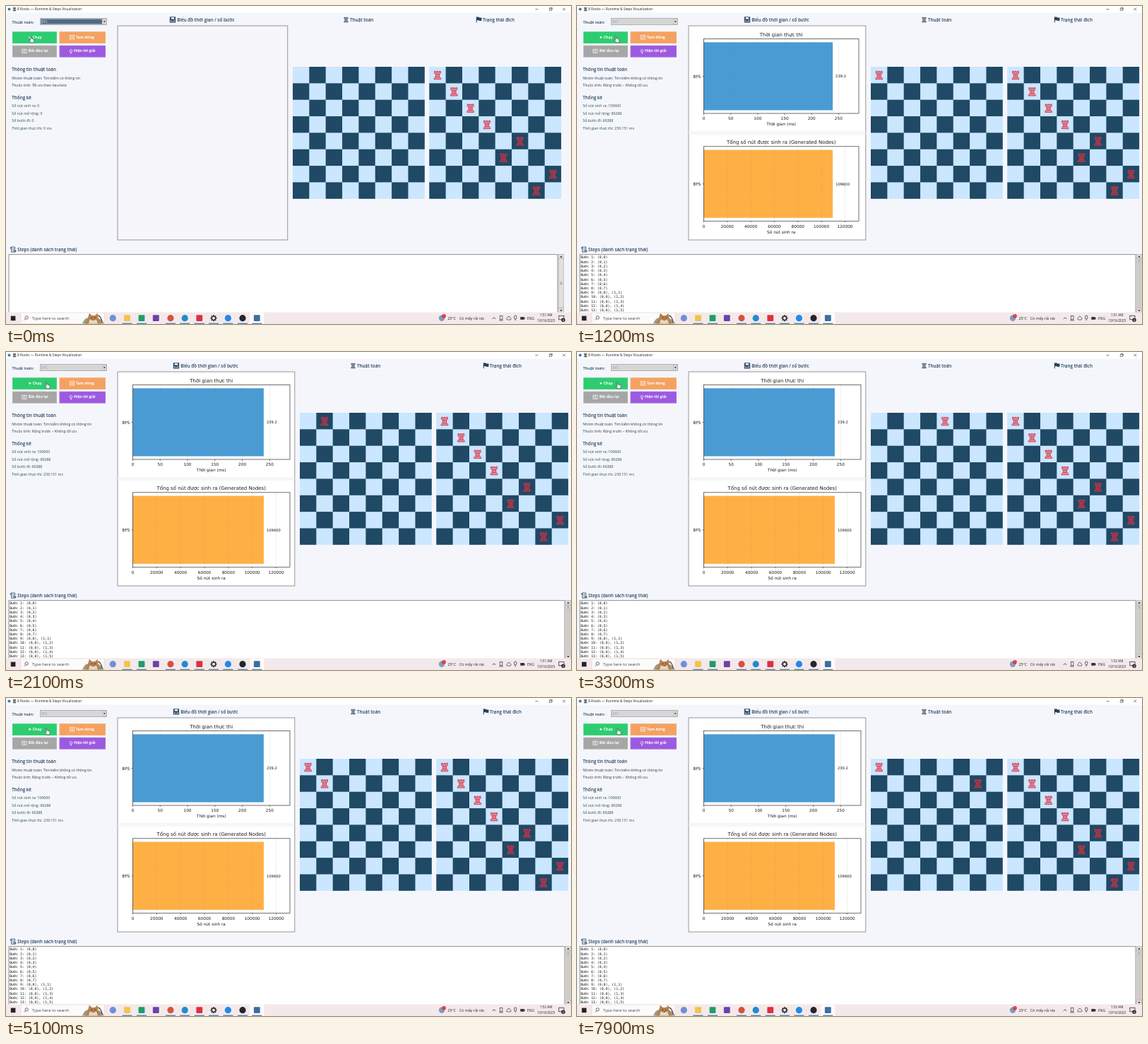
These frames come from a looping animation (800x450 px, 8000 ms). An HTML page:

```html
<!DOCTYPE html>
<html lang="vi">
<head>
<meta charset="utf-8">
<title>8 Rooks</title>
<style>
html, body { margin: 0; width: 100%; height: 100%; overflow: hidden; background: #f5f6fb; }
svg { display: block; width: 800px; height: 450px; }
text { font-family: "Open Sans", "Noto Sans", sans-serif; white-space: pre; }
.plot text { font-family: "DejaVu Sans", sans-serif; fill: #1c1c1c; }
.log text { font-family: "DejaVu Sans Mono", "Liberation Mono", monospace; fill: #151515; }
.idle, .busy, .normal, .pressed, .early, .late, .before, .after, #first, #second, #hand {
  animation: 8s step-end infinite; }
.idle { animation-name: idle; }
.busy { animation-name: busy; }
.normal { animation-name: normal; }
.pressed { animation-name: pressed; }
.early { animation-name: early; }
.late { animation-name: late; }
.before { animation-name: before; }
.after { animation-name: after; }
#first { animation-name: first; }
#second { animation-name: second; }
#hand { animation-name: hand; }
@keyframes idle { 0% { visibility: visible } 14.5%, 100% { visibility: hidden } }
@keyframes busy { 0% { visibility: hidden } 14.5%, 100% { visibility: visible } }
@keyframes normal { 0% { visibility: visible } 12% { visibility: hidden } 14.5%, 100% { visibility: visible } }
@keyframes pressed { 0% { visibility: hidden } 12% { visibility: visible } 14.5%, 100% { visibility: hidden } }
@keyframes early { 0% { visibility: hidden } 14.5% { visibility: visible } 20%, 100% { visibility: hidden } }
@keyframes late { 0% { visibility: hidden } 20%, 100% { visibility: visible } }
@keyframes before { 0% { visibility: visible } 37.5%, 100% { visibility: hidden } }
@keyframes after { 0% { visibility: hidden } 37.5%, 100% { visibility: visible } }
@keyframes first {
  0% { visibility: hidden; transform: translateX(0) }
  14.5% { visibility: visible; transform: translateX(0); animation-timing-function: steps(8) }
  63.49% { visibility: visible; transform: translateX(186.8px) }
  63.5%, 100% { visibility: visible; transform: translateX(0) }
}
@keyframes second {
  0% { visibility: hidden; transform: translateX(0) }
  63.5% { visibility: visible; transform: translateX(0); animation-timing-function: steps(6) }
  100% { visibility: visible; transform: translateX(140.1px) }
}
@keyframes hand {
  0%, 13% { transform: translateX(0); animation-timing-function: linear }
  15.5%, 17% { transform: translateX(25px); animation-timing-function: linear }
  19%, 100% { transform: translateX(22.5px) }
}
</style>
</head>
<body>
<svg id="stage" viewBox="0 0 800 450" xmlns="http://www.w3.org/2000/svg"></svg>
<script>
const NAVY = '#23405c', CELL = 23.35;
const rect = (x, y, w, h, fill, more = '') =>
  `<rect x="${x}" y="${y}" width="${w}" height="${h}" fill="${fill}" ${more}/>`;
const dot = (x, y, r, fill, more = '') => `<circle cx="${x}" cy="${y}" r="${r}" fill="${fill}" ${more}/>`;
const path = (d, stroke, width = 0.7, fill = 'none', more = '') =>
  `<path d="${d}" stroke="${stroke}" stroke-width="${width}" fill="${fill}" ${more}/>`;
const text = (x, y, str, size, fill = '#222', more = '') =>
  `<text x="${x}" y="${y}" font-size="${size}" fill="${fill}" ${more}>${str}</text>`;
const group = (cls, body, more = '') => `<g class="${cls}" ${more}>${body}</g>`;
const at = (x, y, body) => `<g transform="translate(${x} ${y})">${body}</g>`;
const range = n => [...Array(n).keys()];
const SEMI = 'font-weight="600"', BOLD = 'font-weight="700"', MID = 'text-anchor="middle"', END = 'text-anchor="end"';
const heading = (x, y, str) => text(x, y, str, 6.3, NAVY, SEMI);

// Rook centred on the origin
const rook = color =>
  path('M-4.4-5.4h1.8v1.5h1.7v-1.5h1.8v1.5h1.7v-1.5h1.8v3l-1.5 1.3h-5.8l-1.5-1.3z', color, 0.9, color, 'fill-opacity=".45"') +
  path('M-2.4-1.1L-2.8 2.9M2.4-1.1L2.8 2.9M-.9-.8V2.8M.9-.8V2.8', color, 1) +
  path('M-3.3 3h6.6l1.6 1.7v1.3h-9.8v-1.3z', color, 0.9, color, 'fill-opacity=".45"');
const RED = '#e12f40';
const inCell = (row, col, body) => at((col + 0.5) * CELL, (row + 0.5) * CELL, body);

function board(x, body) {
  const dark = range(64).filter(i => (i + (i >> 3)) % 2)
    .map(i => rect((i % 8) * CELL, (i >> 3) * CELL, CELL, CELL, '#1f4965')).join('');
  return at(x, 86, rect(0, 0, 8 * CELL, 8 * CELL, '#cbe6ff') + dark + body);
}
const goal = [0, 1, 2, 3, 5, 4, 7, 6].map((col, row) => inCell(row, col, rook(RED))).join('');

function headers(chartX, shift) {
  const disk = path('M0 0h7.6v7.6h-7.6z', NAVY, 0.6, NAVY) + rect(1.6, 0.5, 4.4, 2.4, '#f5f6fb') +
    path('M1.6 7v-2.4M3.7 7v-1.6M5.8 7v-3', '#f5f6fb', 1);
  const flag = path('M.5 0V8', NAVY, 1) + path('M.8.5h2.8l1 .9h2.8v4h-3.2l-.8-.8h-2.6z', NAVY, 0.4, NAVY);
  return at(chartX, 15.6, disk) + heading(chartX + 10, 21.8, 'Biểu đồ thời gian / số bước') +
    at(481.5 + shift, 19.3, `<g transform="scale(.6)">${rook(NAVY)}</g>`) +
    heading(487 + shift, 21.8, 'Thuật toán') +
    at(665.8 + shift, 15.3, flag) + heading(675 + shift, 21.8, 'Trạng thái đích');
}

function axes(top, right, unit, step, count, value, color, title, label, note) {
  const left = 179.5, bottom = top + 105.5, mid = (left + right) / 2;
  const end = left + value / step * unit;
  const ticks = range(count).map(i => {
    const x = left + i * unit;
    return path(`M${x} ${top}V${bottom}`, '#8f8f8f', 0.5, 'none', 'stroke-opacity=".45" stroke-dasharray="2 1"') +
      path(`M${x} ${bottom}v2`, '#222', 0.6) +
      text(x, bottom + 9.2, i * step, 5.8, '', MID);
  }).join('');
  return rect(left, top, right - left, 105.5, '#fff') +
    rect(left, top + 4.8, end - left, 96.2, color) + ticks +
    rect(left, top, right - left, 105.5, 'none', 'stroke="#333" stroke-width=".7"') +
    path(`M${left - 2} ${top + 53}h2`, '#222', 0.6) +
    text(175.3, top + 55.2, 'BFS', 5.8, '', END) +
    text(end + 4, top + 54.8, note, 5.2) +
    text(mid, top - 3.4, title, 6.95, '', MID) +
    text(mid, bottom + 17.3, label, 5.8, '', MID);
}

const charts = (cls, right, msUnit, nodeUnit) => group(cls + ' plot',
  axes(46.5, right, msUnit, 50, 6, 239.151, '#4a9bd4', 'Thời gian thực thi', 'Thời gian (ms)', '239.2') +
  axes(198.8, right, nodeUnit, 20000, 7, 109600, '#ffb045',
    'Tổng số nút được sinh ra (Generated Nodes)', 'Số nút sinh ra', '109600'));

const frame = (width, fill) => rect(158, 28, width, 303, fill, 'stroke="#8b8b8d" stroke-width=".9"');

function button(x, y, w, fill, icon, label, labelX) {
  return rect(x, y, w, 16.8, fill) +
    rect(x + 0.5, y + 0.5, w - 1, 15.8, 'none', 'stroke="#fff" stroke-opacity=".4" stroke-width=".5" stroke-dasharray="1.5 1.5"') +
    icon + text(labelX, y + 9.4, label, 5.2, '#fff', BOLD);
}
const boxIcon = (x, y, mark) => rect(x, y, 6.2, 5.4, 'none', 'stroke="#fff" stroke-width=".7"') +
  path(mark, '#fff', 0.8, 'none', `transform="translate(${x} ${y})"`);
const play = path('M32.6 42.4l3.4 1.9-3.4 1.9z', 'none', 0, '#fff');
const run = fill => button(9, 36.2, 63, fill, play, 'Chạy', 37.8);

function info(lines) {
  return lines.map((s, i) => text(8.3, [103.8, 114.2, 143.3, 153.8, 164.2, 174.7][i], s, 5.2, i < 2 ? '#263b45' : '#24503f')).join('');
}

function combo(fill, ink) {
  return rect(48.5, 17.6, 94, 8.8, '#dcdcdc', 'stroke="#9a9a9a" stroke-width=".7"') +
    rect(49.4, 18.5, 86.5, 7, fill) + text(50.3, 23.8, 'BFS', 4.8, ink) +
    rect(136.4, 18.2, 5.6, 7.6, '#dedbd6', 'stroke="#aaa" stroke-width=".4"') +
    path('M137.8 21.2h3l-1.5 2z', 'none', 0, '#222');
}

function logBox(width, thumbHeight) {
  const x = width + 5.2, grip = 357.5 + thumbHeight / 2;
  return rect(4, 351.7, width, 90, '#fff', 'stroke="#777" stroke-width=".8"') +
    rect(x, 351.4, 7.6, 84, '#cfcbc6') +
    rect(x, 351.4, 7.6, 6, '#e2dfdb', 'stroke="#aaa" stroke-width=".5"') +
    path(`M${x + 2.1} 355.8h3.4l-1.7-2.4z`, 'none', 0, '#222') +
    rect(x, 357.6, 7.6, thumbHeight, '#e2dfdb', 'stroke="#aaa" stroke-width=".5"') +
    path(`M${x + 2} ${grip - 1.2}h3.6m-3.6 1.3h3.6m-3.6 1.3h3.6`, '#777', 0.5) +
    rect(x, 427.8, 7.6, 6, '#e2dfdb', 'stroke="#aaa" stroke-width=".5"') +
    path(`M${x + 2.1} 430h3.4l-1.7 2.2z`, 'none', 0, '#222');
}
const log = group('log', range(13).map(i => {
  const spot = i < 8 ? `(0,${i})` : `(0,0), (1,${i - 7})`;
  return text(5.2, 357.4 + i * 6.22, `Bước ${i + 1}: ${spot}`, 4.9, '', 'font-weight="500"');
}).join(''));

function titleBar() {
  return rect(0, 0, 800, 9.4, '#fff') + dot(4.5, 4.5, 2, '#3d78b5') +
    at(12, 4.5, `<g transform="scale(.42)">${rook('#111')}</g>`) +
    text(16, 6.4, '8 Rooks — Runtime &amp; Steps Visualization', 4.8, '#222') +
    path('M749.5 4.5h4M769.3 3.3h3v3h-3zM770.3 3.3v-1h3v3h-1M788.3 2.6l3.8 3.8m0-3.8l-3.8 3.8', '#333', 0.6);
}

function lynx() {
  return path('M108 449.5q4-10 10-8l8-1q10 2 13 9z', 'none', 0, '#8fa08a') +
    path('M112 449.5l4-8 2-7 3.5 3.4h4.5l3.4-3.4 1 8 4 7z', 'none', 0, '#b5814f') +
    path('M118.5 443.5q5 2.5 9.5 0l2 6h-13z', 'none', 0, '#e8d7c0') +
    dot(121.3, 441.2, 0.7, '#30251c') + dot(126, 441.2, 0.7, '#30251c') +
    path('M122.5 443.8h2.4l-1.2 1.2z', 'none', 0, '#6b3f31') +
    path('M130 438q5 1 6 10', '#6f5134', 1.4);
}

function taskbar() {
  const square = (x, fill) => rect(x - 4.4, 437.3, 8.8, 8.8, fill, 'rx="1"');
  const round = (x, fill) => dot(x, 441.7, 4.6, fill);
  const clock = (cls, s) => group(cls, text(764.7, 439.4, s, 4.7, '#222', MID));
  const teeth = range(8).map(i => rect(-0.9, -4.5, 1.8, 2, '#333', `transform="rotate(${i * 45})"`)).join('');
  return rect(0, 433.4, 800, 16.6, '#f4e9ea') +
    rect(6.8, 438.6, 6.6, 6.6, '#222') +
    rect(21, 434, 118, 15.6, '#fdfafa', 'stroke="#ddd3d4" stroke-width=".5"') +
    dot(29.2, 440.9, 2.2, 'none', 'stroke="#333" stroke-width=".7"') + path('M27.6 442.6l-2 2.1', '#333') +
    text(37, 443.7, 'Type here to search', 5.75, '#444') + lynx() +
    rect(345.3, 433.8, 20, 16.2, '#fffafa') +
    round(151.3, '#6f8fd8') + square(171.5, '#f5c34a') + square(192, '#1f9d6b') + square(212.3, '#6a42a8') +
    round(233, '#dc4f3c') + round(253.2, '#2489cf') + square(273.8, '#e02f3f') +
    at(294, 441.7, teeth + dot(0, 0, 2.7, 'none', 'stroke="#333" stroke-width="1.5"')) +
    round(314.4, '#2588e8') + round(335, '#25252b') + square(355.3, '#3c6f9f') +
    [171.5, 192, 233, 253.2, 273.8, 294, 314.4, 335, 355.3].map(x => rect(x - 7, 448.7, 14, 1.3, '#4787bd')).join('') +
    dot(617, 441.7, 4.2, '#7e9dc0') + dot(620, 438.7, 2.8, '#d9303b') + text(620, 440.2, '1', 4, '#fff', MID) +
    text(625.4, 443.6, '25°C', 5.4, '#222') + text(641.7, 443.6, 'Có mấy rải rác', 5.4, '#222') +
    path('M688.8 442.9l2.2-2.2 2.2 2.2', '#222', 0.8) +
    rect(699.3, 438.3, 3.6, 5.5, 'none', 'stroke="#333" stroke-width=".7"') + path('M698.3 445h5.6', '#333') +
    path('M709.5 444h5q1.6-1.8-.6-3q-1-2.6-3.1-1.4q-1.2.8-1 1.8q-2.2.9-.3 2.6z', '#333') +
    rect(719.6, 438, 3.2, 5, 'none', 'rx="1.6" stroke="#333" stroke-width=".8"') + path('M721.2 443v2.2', '#333') +
    rect(728.3, 440, 5.5, 3.8, '#333') + rect(734, 441, 0.8, 1.8, '#333') +
    text(738, 443.5, 'ENG', 4.9, '#222') +
    clock('before', '1:51 AM') + clock('after', '1:52 AM') + text(764.7, 447.2, '10/16/2025', 4.7, '#222', MID) +
    rect(782.8, 438.3, 7.2, 5.5, 'none', 'stroke="#333" stroke-width=".8"') +
    dot(789, 444.2, 2.8, '#333') + text(789, 445.6, '4', 3.8, '#fff', MID);
}

const hand = path('M34 43.2q1.1-.7 1.5.6l.5 2.4q.9-.5 1.3.4q.9-.4 1.3.5q1-.2 1.1.8l.1 2-.8 2h-3.6l-2.6-3.3q.3-1.1 1.6-.2z',
  '#222', 0.6, '#fff');
const bulb = dot(92, 63.5, 1.8, 'none', 'stroke="#fff" stroke-width=".7"') + path('M91 66h2M91.2 67.1h1.6', '#fff');
const scroll = path('M7.6 341h5v7.2h-5zM7.6 341q-1.6.2-1.4 2h1.4M12.6 348.2q1.7-.1 1.5-1.8h-4.5', NAVY, 0.8) +
  path('M8.9 343.2h2.6m-2.6 1.7h2.6', NAVY, 0.6);

document.getElementById('stage').innerHTML =
  rect(0, 0, 800, 450, '#f5f6fb') + titleBar() +
  text(8.6, 24.5, 'Thuật toán:', 5.6, NAVY, SEMI) +
  group('normal', run('#2ecc71')) + group('pressed', run('#264653')) +
  button(75.5, 36.2, 65.5, '#f4a261', boxIcon(90.5, 41.6, 'M2.2 1.3v2.8M4 1.3v2.8'), 'Tạm dừng', 99) +
  button(9, 55.8, 63, '#a6a6a6', boxIcon(22.8, 61.2, 'M4.3 1.4q-2.8-.4-2.6 1.5q1.3 1.9 2.8.3'), 'Bắt đầu lại', 31.7) +
  button(75.5, 55.8, 65.5, '#9d5ae0', bulb, 'Hiện lời giải', 96) +
  heading(8.3, 92, 'Thông tin thuật toán') + heading(8.3, 131.6, 'Thống kê') +
  scroll + heading(16, 347, 'Steps (danh sách trạng thái)') +
  group('idle',
    combo('#4d6b85', '#dbe4ec') + headers(232.2, 0) + frame(240.8, '#f6f6fb') +
    info(['Nhóm thuật toán: Tìm kiếm có thông tin', 'Thuộc tính: Tối ưu theo heuristic',
      'Số nút sinh ra: 0', 'Số nút mở rộng: 0', 'Số bước đi: 0', 'Thời gian thực thi: 0 ms']) +
    board(406, '') + board(599.3, goal) + logBox(777, 69.5)) +
  group('busy',
    combo('#d6d6d6', '#a2a2a2') + headers(237.2, 10) + frame(250.8, '#fff') + rect(158.5, 176.8, 249.8, 5, '#f5f6fb') +
    info(['Nhóm thuật toán: Tìm kiếm không có thông tin', 'Thuộc tính: Rộng trước – Không tối ưu',
      'Số nút sinh ra: 109600', 'Số nút mở rộng: 69288', 'Số bước đi: 69288', 'Thời gian thực thi: 239.151 ms']) +
    board(416, '') + board(609.3, goal) + logBox(787, 5.5) + log) +
  charts('early', 399, 38.18, 33.33) + charts('late', 402, 38.76, 33.85) +
  at(416, 86, `<g id="first">${inCell(0, 0, rook(RED))}</g><g id="second">${inCell(1, 1, rook(RED))}</g>`) +
  taskbar() + `<g id="hand">${hand}</g>`;
</script>
</body>
</html>
```
